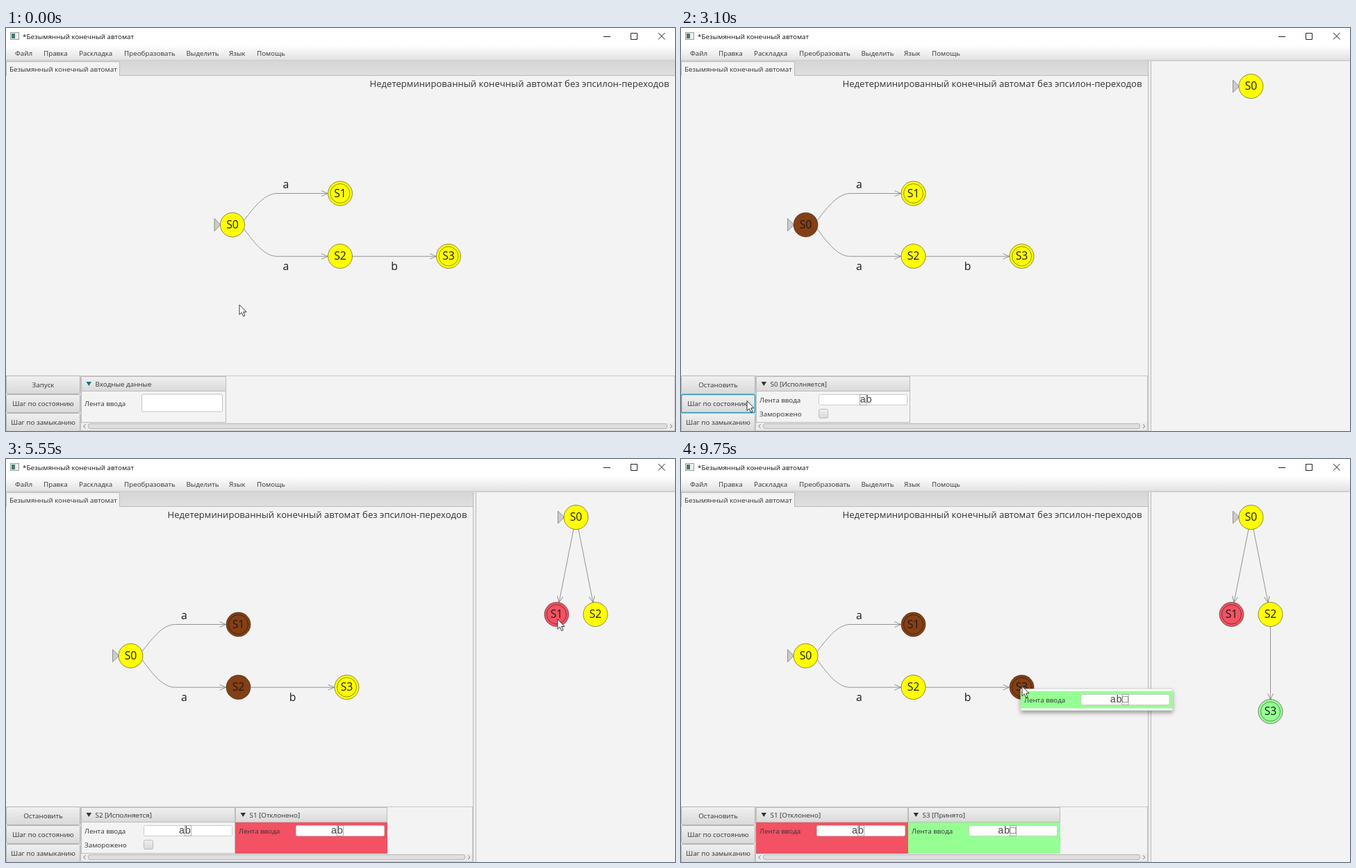
An HTML page for the animation above (9.85 s loop, 963 by 581 pixels).

```html
<!DOCTYPE html>
<html lang="ru">
<head>
<meta charset="utf-8">
<title>Конечный автомат</title>
<style>
html, body { margin: 0; width: 100%; height: 100%; overflow: hidden; background: #f3f3f3; }
svg { display: block; }
text { font: 9.8px "Open Sans", "Noto Sans", sans-serif; fill: #333; white-space: pre; }
.node, .edge { font-size: 15.8px; fill: #1c1c1c; text-anchor: middle; }
.heading { font-size: 13.13px; text-anchor: end; }
.tape { font: 14.5px "Liberation Mono", monospace; fill: #444; }
</style>
</head>
<body>
<svg width="963" height="581" viewBox="0 0 963 581">
  <defs>
    <linearGradient id="menu" x2="0" y2="1"><stop stop-color="#fff"/><stop offset="1" stop-color="#e1e1e1"/></linearGradient>
    <linearGradient id="tabs" x2="0" y2="1"><stop stop-color="#d6d6d6"/><stop offset="1" stop-color="#dfdfdf"/></linearGradient>
    <linearGradient id="button" x2="0" y2="1"><stop stop-color="#f0f0f0"/><stop offset="1" stop-color="#d9d9d9"/></linearGradient>
    <filter id="shadow" x="-10%" y="-40%" width="120%" height="200%"><feDropShadow dx="0" dy="3" stdDeviation="3" flood-opacity=".4"/></filter>
  </defs>
  <g id="scene"></g>
  <path id="cursor" d="M0 0V14.2L3.3 11.2 5.7 16.6 8 15.6 5.6 10.4H10Z" fill="#fff" stroke="#222" stroke-width=".9"/>
</svg>
<script>
const LOOP = 9850;
const YELLOW = '#ff0', BROWN = '#853f15', RED = '#f25263', GREEN = '#96ff94';
const INK = '#888', BORDER = '#bcbcbc', FOCUS = '#2a9fc4';
const CHAR = 8.7; // advance of one tape character

const rect = (x, y, w, h, fill, stroke = 'none', extra = '') =>
  `<rect x="${x}" y="${y}" width="${w}" height="${h}" fill="${fill}" stroke="${stroke}" ${extra}/>`;
const path = (d, stroke = INK, fill = 'none', width = .9) =>
  `<path d="${d}" stroke="${stroke}" fill="${fill}" stroke-width="${width}"/>`;
const text = (x, y, value, cls = '', extra = '') => `<text x="${x}" y="${y}" class="${cls}" ${extra}>${value}</text>`;
const centered = 'text-anchor="middle"';

function node(name, x, y, fill = YELLOW) {
  const ring = r => `<circle cx="${x}" cy="${y}" r="${r}" fill="${fill}" stroke="#000" stroke-opacity=".55" stroke-width=".8"/>`;
  const start = name === 'S0' ? path(`M${x - 26} ${y - 9}V${y + 9}L${x - 17} ${y}Z`, '#888', '#ccc') : '';
  const final = name === 'S1' || name === 'S3';
  return start + ring(17.5) + (final ? ring(14) : '') + text(x, y + 5.2, name, 'node');
}

function arrow(x1, y1, x2, y2) {
  const angle = Math.atan2(y2 - y1, x2 - x1) * 180 / Math.PI;
  return path(`M${x1} ${y1}L${x2} ${y2}`) +
    `<g transform="translate(${x2} ${y2}) rotate(${angle})">${path('M-9 -4L0 0L-9 4')}</g>`;
}

// The head cell has a fixed place in the field; the tape slides under it.
function tape(x, y, value, head) {
  const cell = x + 59.5;
  return rect(x + .5, y + .5, 127, 15, '#fff', '#ccc', 'rx="2"') +
    rect(cell, y + .5, 9, 15, '#fff', '#999', 'stroke-width=".8"') +
    text(cell - head * CHAR, y + 12, value, 'tape');
}

function header(x, w, title, arrowFill = '#333') {
  return rect(x + .5, 502.5, w - 1, 21, 'url(#button)', BORDER) +
    path(`M${x + 7.5} 510H${x + 15}L${x + 11.3} 516Z`, 'none', arrowFill) + text(x + 20.5, 516.5, title);
}

const STATUS = {
  run: ['Исполняется', '#f3f3f3'],
  rejected: ['Отклонено', RED],
  accepted: ['Принято', GREEN],
};

function panel(x, { name, status, value = 'ab', head = 1 }) {
  const [label, fill] = STATUS[status], running = status === 'run', w = running ? 222 : 219;
  const frozen = running
    ? text(x + 5, 560, 'Заморожено') + rect(x + 90.5, 549.5, 13, 13, 'url(#button)', BORDER, 'rx="2"') : '';
  return rect(x + .5, 523.5, w - 1, 45, fill, running ? BORDER : fill) + header(x, w, `${name} [${label}]`) +
    text(x + 5, 540, 'Лента ввода') + tape(x + (running ? 90 : 87), 528, value, head) + frozen;
}

function inputPanel({ input, focus }) {
  const editing = focus === 'input';
  return rect(108.5, 523.5, 208, 45, '#f3f3f3', BORDER) +
    header(108, 209, 'Входные данные', editing ? '#333' : '#12708f') + text(113, 544.5, 'Лента ввода') +
    rect(195.5, 528, 116, 25, '#fff', editing ? FOCUS : '#c4c4c4', `rx="2" stroke-width="${editing ? 1.6 : 1}"`) +
    text(203.5, 545, input, 'tape') +
    (editing ? path(`M${203.5 + input.length * CHAR} 532V549`, '#222', 'none', 1) : '');
}

function button(y, label, focused) {
  return rect(.5, y + .5, 106, 26, 'url(#button)', focused ? FOCUS : '#b4b4b4', `rx="2" stroke-width="${focused ? 1.5 : 1}"`) +
    text(53.5, y + 17.2, label, '', centered);
}

function windowFrame() {
  const menus = [[13, 'Файл'], [54, 'Правка'], [105, 'Раскладка'], [170, 'Преобразовать'], [259.5, 'Выделить'], [321, 'Язык'], [361, 'Помощь']];
  return rect(0, 0, 963, 25, '#fff') + rect(0, 25, 963, 22, 'url(#menu)') + rect(0, 46.5, 963, 1, '#b8b8b8') +
    rect(6.5, 6.5, 12, 10, '#eee', '#999') + rect(8, 8, 5, 7, '#447b70') +
    text(24, 16, '*Безымянный конечный автомат', '', 'style="fill:#111"') +
    path('M860 12.5H870M899.5 7.5H908.5V16.5H899.5ZM939 7L948.5 16.5M948.5 7L939 16.5', '#222', 'none', 1) +
    menus.map(([x, label]) => text(x, 40, label)).join('');
}

function automaton(dx, lit) {
  const state = (name, x, y) => node(name, x, y, lit.includes(name) ? BROWN : YELLOW);
  return `<g transform="translate(${dx})">` +
    path('M343 277C358 257 373 238.5 390 238.5M343 290C358 311 373 329.2 390 329.2') +
    arrow(390, 238.5, 463, 238.5) + arrow(390, 329.2, 463, 329.2) + arrow(499, 329.2, 619, 329.2) +
    state('S0', 326, 283.7) + state('S1', 481, 238.5) + state('S2', 481, 329) + state('S3', 637, 329) +
    text(403, 231, 'a', 'edge') + text(403, 349, 'a', 'edge') + text(559, 349, 'b', 'edge') + '</g>';
}

function tree({ s1, s3 }) {
  return rect(672, 48, 5, 533, '#ececec') + path('M672.5 48V581M676.5 48V581', BORDER, 'none', 1) +
    (s1 ? arrow(817, 101, 796, 207) + arrow(824, 101, 845, 207) + node('S1', 792.5, 224, s1) + node('S2', 848.5, 224) : '') +
    (s3 ? arrow(848.5, 242, 848.5, 347) + node('S3', 848.5, 364, s3) : '') + node('S0', 820.5, 84);
}

function tooltip() {
  return `<g filter="url(#shadow)">${rect(489, 331.5, 218.5, 31, '#fff', '#ccc', 'stroke-width=".6"')}</g>` +
    rect(489, 334.5, 218.5, 25, GREEN) + text(494, 351, 'Лента ввода') + tape(575.5, 339, 'ab□', 2);
}

function draw(s) {
  const running = !!s.panels, right = running ? 672 : 963;
  let x = 108, bottom = '';
  if (running) for (const p of s.panels) {
    bottom += panel(x, p);
    x += p.status === 'run' ? 222 : 219;
  } else bottom = inputPanel(s);
  return windowFrame() + rect(0, 48, right, 20.5, 'url(#tabs)') + rect(0, 68, right, 1, BORDER) +
    path('M.5 69V48.5H163.5V69', BORDER, '#f3f3f3', 1) + text(5, 63, 'Безымянный конечный автомат') +
    text(right - 8.5, 85, 'Недетерминированный конечный автомат без эпсилон-переходов', 'heading') +
    automaton(running ? -146.5 : 0, s.lit || []) + (running ? tree(s) : '') +
    rect(107.5, 501.5, right - 108, 79, '#f3f3f3', '#c8c8c8') + rect(0, 501, right, 1, '#c8c8c8') + bottom +
    rect(108, 569, right - 109, 11, '#ececec') + rect(118.5, 570.5, right - 130, 7, '#dedede', '#b8b8b8', 'rx="2.5"') +
    path(`M114.5 571.5L111.5 574.3L114.5 577M${right - 7} 571.5L${right - 4} 574.3L${right - 7} 577`, '#777', 'none', 1) +
    button(501, running ? 'Остановить' : 'Запуск') + button(528, 'Шаг по состоянию', s.focus === 'step') +
    button(555, 'Шаг по замыканию') + (s.tip ? tooltip() : '');
}

const s1Run = { name: 'S1', status: 'run' }, s2Run = { name: 'S2', status: 'run' };
const s1Rejected = { name: 'S1', status: 'rejected' };
const accepted = {
  lit: ['S1', 'S3'], s1: RED, s3: GREEN,
  panels: [s1Rejected, { name: 'S3', status: 'accepted', value: 'ab□', head: 2 }],
};
const scenes = [
  [0, { input: '' }],
  [850, { input: '', focus: 'input' }],
  [1150, { input: 'a', focus: 'input' }],
  [1350, { input: 'ab', focus: 'input' }],
  [2550, { focus: 'step', lit: ['S0'], panels: [{ name: 'S0', status: 'run', head: 0 }] }],
  [3400, { focus: 'step', lit: ['S1', 'S2'], s1: YELLOW, panels: [s1Run, s2Run] }],
  [5200, { lit: ['S1', 'S2'], s1: RED, panels: [s2Run, s1Rejected] }],
  [6200, accepted],
  [9250, { ...accepted, tip: true }],
];

// time, x, y of the pointer
const route = [
  [0, 336, 399], [100, 336, 399], [800, 250, 536], [1650, 250, 536], [2250, 95, 537.5], [3700, 95, 537.5],
  [4550, 627, 335], [4900, 794, 231], [5650, 794, 231], [5950, 848, 231], [6400, 848, 231],
  [6850, 560, 305.5], [7250, 336, 239], [8800, 336, 239], [9000, 481, 329], [9250, 491, 327.5], [LOOP, 491, 327.5],
];

function pointerAt(t) {
  const i = route.findIndex(p => p[0] > t);
  const [t0, x0, y0] = route[i - 1], [t1, x1, y1] = route[i];
  const k = (t - t0) / (t1 - t0);
  return [x0 + (x1 - x0) * k, y0 + (y1 - y0) * k];
}

const sceneLayer = document.getElementById('scene'), cursor = document.getElementById('cursor');
const begin = performance.now();
let shown;

function tick() {
  const t = Math.max(0, performance.now() - begin) % LOOP;
  const current = scenes.filter(([at]) => at <= t).pop()[1];
  if (current !== shown) sceneLayer.innerHTML = draw(shown = current);
  cursor.setAttribute('transform', `translate(${pointerAt(t)})`);
  requestAnimationFrame(tick);
}
tick();
</script>
</body>
</html>
```
